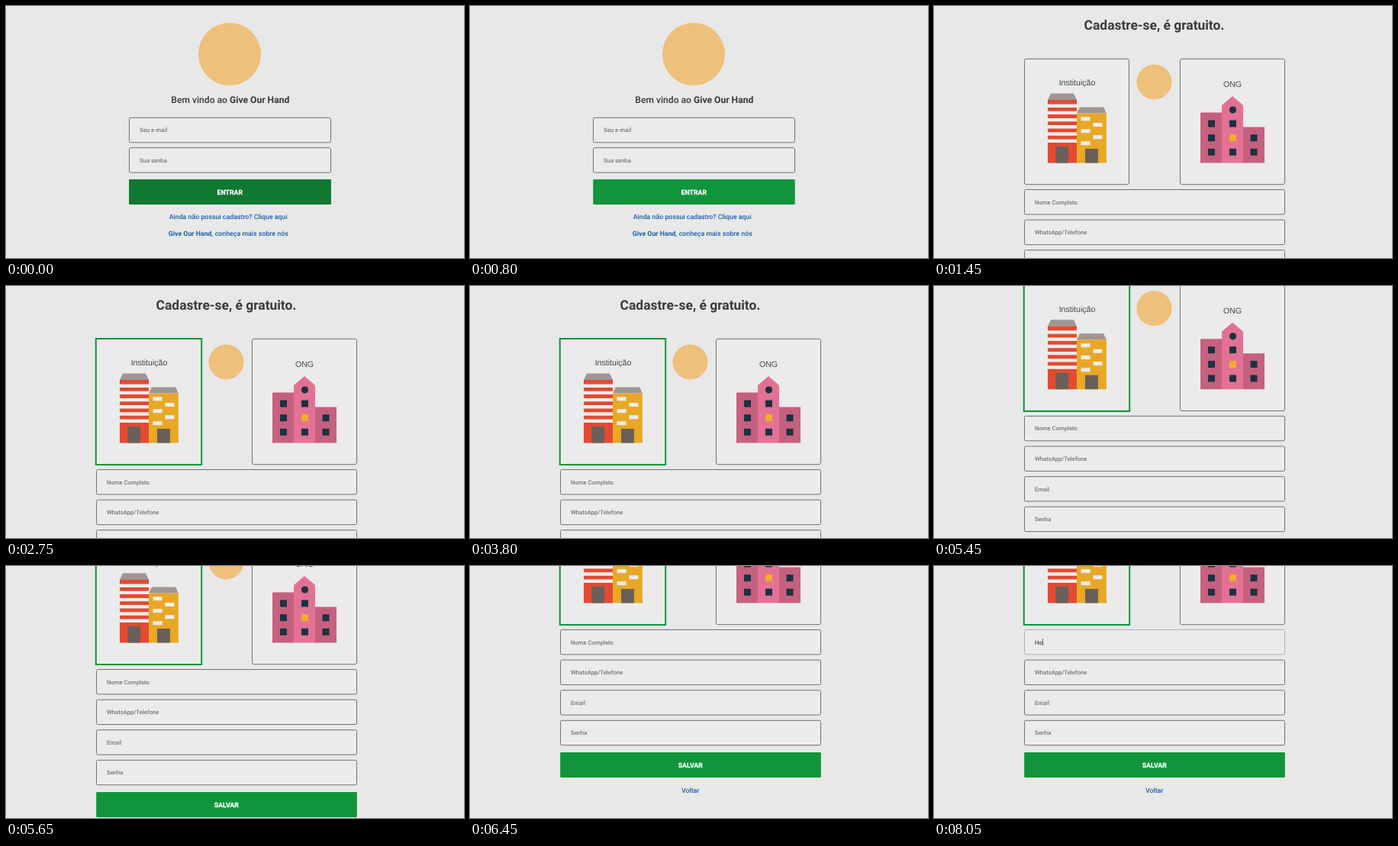
These frames come from a looping animation (600 by 330 pixels, 8.1 s). An HTML page:

```html
<!DOCTYPE html>
<html lang="pt-BR">
<head>
<meta charset="utf-8">
<title>Cadastro</title>
<style>
html, body { margin: 0; width: 100%; height: 100%; overflow: hidden; background: #e8e8e8; }
svg { display: block; width: 600px; height: 330px; }
text { font-family: Roboto, sans-serif; text-rendering: geometricPrecision; }

.input, .card { fill: #ebebeb; stroke: #707070; }
.hint { font-size: 7.7px; font-weight: 500; fill: #757575; }
.typed { font-size: 7.7px; font-weight: 500; fill: #444; }
.mid { text-anchor: middle; }
.welcome { font-size: 12.1px; font-weight: 500; fill: #3a3a3c; }
.title { font-size: 17.4px; font-weight: 700; fill: #3a3a3c; }
.link { font-size: 8.8px; font-weight: 500; fill: #1b5fab; }
.btn { fill: #10953c; }
.btn-text { font-size: 8.8px; font-weight: 700; fill: #fff; stroke: #fff; stroke-width: 0.25; }
.picked { fill: #ebebeb; stroke: #0f953b; stroke-width: 2; }
.label { font: 10.6px "Liberation Sans", Arial, sans-serif; fill: #444; }
.logo { fill: #edc07b; }
.bold { font-weight: 700; }

/* one 8.1 s loop, hard changes */
.login, .signup, .hover, .pick-a, .pick-b, .name-box, .name-hint, .one, .two, .caret {
  animation: 8.1s step-end infinite;
}
.login { animation-name: login; }
.signup { animation-name: signup; }
.hover { fill: #0f7831; animation-name: hover; }
.pick-a { animation-name: pick-a; }
.pick-b { animation-name: pick-b; }
.name-box { animation-name: focus; }
.name-hint { animation-name: hint; }
.one { animation-name: one; }
.two { animation-name: two; }
.caret { fill: #333; animation-name: caret; }
.page { animation: scroll 8.1s linear infinite; }

@keyframes login { 0% { opacity: 1 } 13.58%, 100% { opacity: 0 } }
@keyframes signup { 0% { opacity: 0 } 13.58%, 100% { opacity: 1 } }
@keyframes hover { 0% { opacity: 1 } 4.94%, 100% { opacity: 0 } }
@keyframes pick-a { 0% { opacity: 0 } 26.54% { opacity: 1 } 35.8% { opacity: 0 } 44.44%, 100% { opacity: 1 } }
@keyframes pick-b { 0% { opacity: 0 } 35.8% { opacity: 1 } 44.44%, 100% { opacity: 0 } }
@keyframes focus { 0% { stroke: #707070 } 88.88%, 100% { stroke: #b0b0b0 } }
@keyframes hint { 0% { opacity: 1 } 95.67%, 100% { opacity: 0 } }
@keyframes one { 0% { opacity: 0 } 95.67% { opacity: 1 } 98.14%, 100% { opacity: 0 } }
@keyframes two { 0% { opacity: 0 } 98.14%, 100% { opacity: 1 } }
@keyframes caret {
  0% { opacity: 0; transform: none }
  88.88% { opacity: 1; transform: none }
  95.06% { opacity: 0; transform: none }
  95.67% { opacity: 1; transform: translateX(5.5px) }
  98.14%, 100% { opacity: 1; transform: translateX(10px) }
}
@keyframes scroll {
  0%, 64.835% { transform: none }
  68.52%, 74.69% { transform: translateY(-105px) }
  76.54%, 100% { transform: translateY(-157px) }
}
</style>
</head>
<body>
<svg viewBox="0 0 600 330">
  <g class="login">
    <circle class="logo" cx="293" cy="63" r="41"/>
    <text class="welcome mid" x="293.8" y="127.3">Bem vindo ao <tspan class="bold">Give Our Hand</tspan></text>
    <rect class="input" x="161.5" y="146.3" width="264" height="32.5" rx="2"/>
    <text class="hint" x="175" y="165.2">Seu e-mail</text>
    <rect class="input" x="161.5" y="185.6" width="264" height="32.5" rx="2"/>
    <text class="hint" x="175" y="204.7">Sua senha</text>
    <rect class="btn" x="161.3" y="227" width="264.4" height="33" rx="1"/>
    <rect class="hover" x="161.3" y="227" width="264.4" height="33" rx="1"/>
    <text class="btn-text mid" x="293.3" y="246.7">ENTRAR</text>
    <text class="link mid" x="291.2" y="279.3">Ainda não possui cadastro? Clique aqui</text>
    <text class="link mid" x="291.2" y="300.8"><tspan class="bold">Give Our Hand</tspan>, conheça mais sobre nós</text>
  </g>

  <g class="signup">
    <g class="page">
      <text class="title mid" x="288.5" y="31.2">Cadastre-se, é gratuito.</text>
      <circle class="logo" cx="288.5" cy="99.5" r="23"/>

      <rect class="card" x="118.5" y="69.3" width="137" height="164.4" rx="2.5"/>
      <rect class="picked pick-a" x="117.8" y="69" width="138.4" height="165"/>
      <text class="label mid" x="187.5" y="104.3">Instituição</text>
      <path fill="#9e9793" d="M153 114.5h30l4 8.5h-38zM191 132.5h31l4 8h-39z"/>
      <path fill="#e24b32" d="M149 123h38v82.5h-38z"/>
      <path stroke="#efecea" stroke-width="38" stroke-dasharray="4.4 4.8" d="M168 128.5v51"/>
      <path fill="#e8a826" d="M187 140.5h39v65h-39z"/>
      <path fill="#efecea" d="M192.5 145.3h12v5h-12zM208.5 153h12v5h-12zM192.5 161.2h12v5h-12zM208.5 169.2h12v5h-12zM192.5 177.3h12v5h-12z"/>
      <path fill="#6a5f59" d="M159.5 184h16.5v21.5h-16.5zM198 187h17v18.5h-17z"/>

      <rect class="card" x="322.5" y="69.3" width="137" height="164.4" rx="2.5"/>
      <rect class="picked pick-b" x="321.8" y="69" width="138.4" height="165"/>
      <text class="label mid" x="391" y="106.3">ONG</text>
      <path fill="#c5617f" d="M349 139.5h28v66h-28zM405 158.5h28v47h-28z"/>
      <path fill="#e27294" d="M377 130l14-12 14 12v75.5h-28z"/>
      <circle fill="#1d3141" cx="391.5" cy="136" r="4.6"/>
      <path fill="#1d3141" d="M359 149.5h9v9h-9zm0 18.7h9v9h-9zm0 18.5h9v9h-9zM387 149.5h9v9h-9zm0 37.2h9v9h-9zM414.5 168.2h9v9h-9zm0 18.5h9v9h-9z"/>
      <path fill="#f0ad31" d="M387 168.2h9v9h-9z"/>

      <rect class="input name-box" x="118.5" y="240.5" width="341" height="32.4" rx="2"/>
      <text class="hint name-hint" x="132" y="259.5">Nome Completo</text>
      <text class="typed one" x="132" y="259.5">H</text>
      <text class="typed two" x="132" y="259.5">Ho</text>
      <rect class="caret" x="132" y="252" width="0.8" height="9"/>
      <rect class="input" x="118.5" y="280.1" width="341" height="32.4" rx="2"/>
      <text class="hint" x="132" y="299.2">WhatsApp/Telefone</text>
      <rect class="input" x="118.5" y="319.7" width="341" height="32.4" rx="2"/>
      <text class="hint" x="132" y="338.7">Email</text>
      <rect class="input" x="118.5" y="359.3" width="341" height="32.4" rx="2"/>
      <text class="hint" x="132" y="378.2">Senha</text>
      <rect class="btn" x="118.2" y="401" width="341.6" height="33" rx="1"/>
      <text class="btn-text mid" x="288.8" y="420.5">SALVAR</text>
      <text class="link mid" x="288.7" y="453.5">Voltar</text>
    </g>
  </g>
</svg>
</body>
</html>
```
